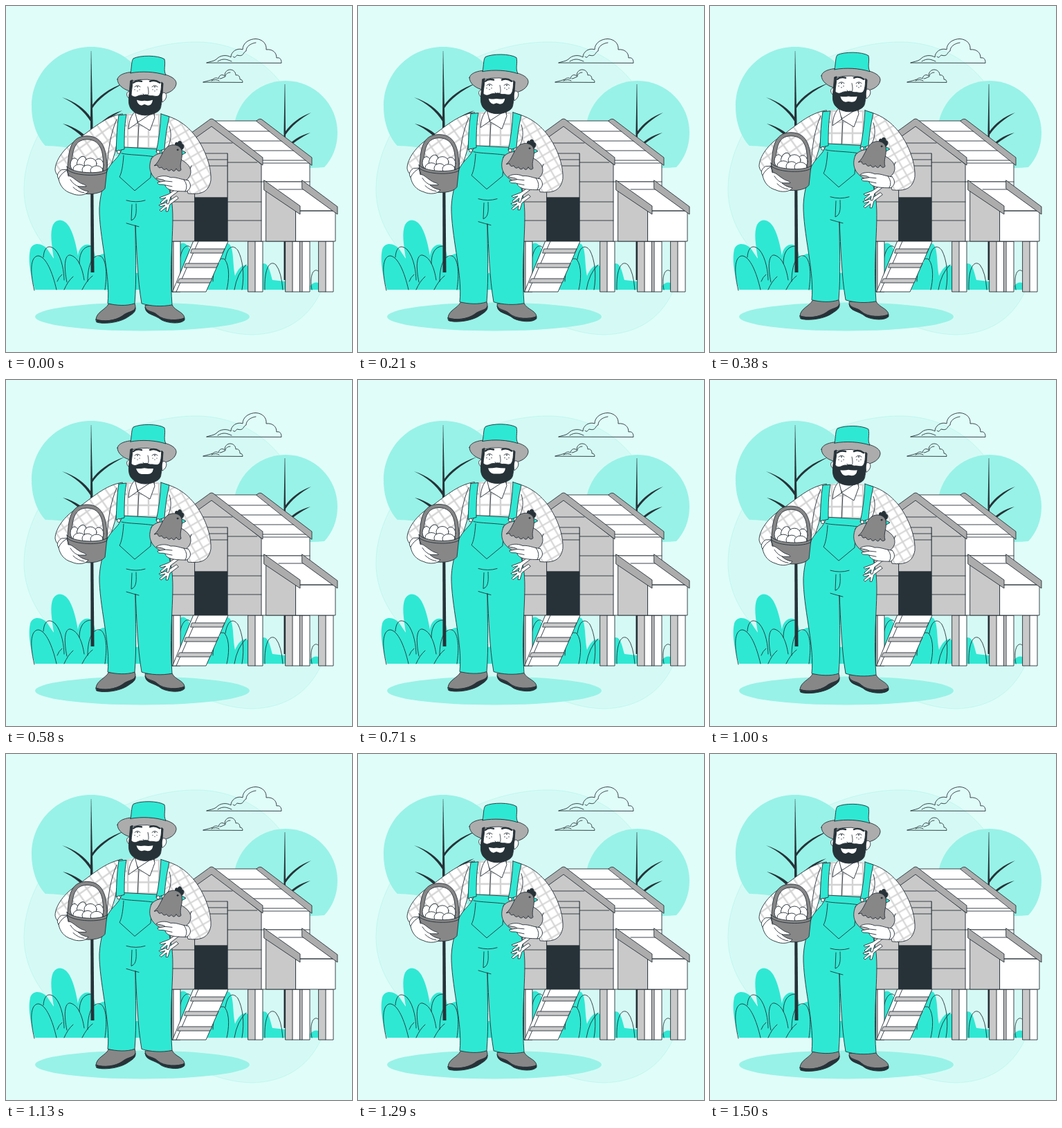
Animation of 500x500 px, one loop 1540 ms. Source, as an HTML page:

```html
<!DOCTYPE html>
<html lang="en">
<head>
<meta charset="utf-8">
<title>Farmer with hen</title>
<style>
  html, body { margin: 0; width: 100%; height: 100%; overflow: hidden; background: #e0fdf9; }
  svg { display: block; width: 100%; height: 100%; }
  .o { stroke: #263238; stroke-width: .9; stroke-linejoin: round; stroke-linecap: round; }
  .n { fill: none; }
  .w { fill: #fff; }
  .t { fill: #2fe8d3; }
  .m { fill: #98f2e7; }
  .d { fill: #263238; }
  .l { fill: #c9c9c9; }
  .g { fill: #acacac; }
  .k { fill: #878787; }
  .p { fill: none; stroke: #d2d2d2; stroke-width: 2.4; }
  .brow { fill: none; stroke-width: 2.4; }
</style>
</head>
<body>
<svg viewBox="0 0 500 500">
  <defs>
    <pattern id="plaid" width="15" height="16" patternUnits="userSpaceOnUse" patternTransform="translate(3 5)">
      <path class="w" d="M0 0H15V16H0Z"/><path class="p" d="M8 0V16M0 8H15"/>
    </pattern>
    <pattern id="plaidL" href="#plaid" patternTransform="translate(5 4) rotate(-35) scale(.9)"/>
    <pattern id="plaidR" href="#plaid" patternTransform="translate(2 4) rotate(60) scale(.8)"/>
    <path id="foot" d="M247 264L235 272L222 277L224 279L231 277L223 284L225 286L233 280L232 286L235 286L238 276L250 267Z"/>
  </defs>

  <!-- backdrop -->
  <path fill="#d5faf5" stroke="#b5f5ed" stroke-width=".7" d="M26 265C26 205 65 145 110 110C160 72 220 52 275 52C325 52 370 75 398 112C425 150 433 200 436 250C440 310 466 340 462 385C460 400 458 407 455 413C435 455 400 474 355 475C300 474 265 445 200 430C100 405 27 345 26 265Z"/>
  <path class="m" d="M57 202C45 190 37 168 37 145C37 97 75 59 123 59C171 59 209 97 209 145C209 180 190 210 160 217C125 213 90 202 57 202Z"/>
  <path class="m" d="M345 230C335 217 329 201 329 183C329 142 362 108 404 108C446 108 479 142 479 183C479 203 472 220 460 233C420 236 380 234 345 230Z"/>
  <ellipse class="m" cx="197" cy="449" rx="155" ry="20.5"/>

  <!-- clouds -->
  <g class="o n">
    <path d="M290 82C296 80 300 80 304 77C309 71 319 70 325 74C325 66 334 60 342 63C342 53 352 47.500 361 47.500C371 48 377 55 376 63C385 62 391 67 391 75C396 74 398 77 398 82ZM306 80C314 75 319 77 326 80M328 73C331 77 333 71 334 71C344 74 342 67 347 65C347 59 353 54 361 53"/>
    <path d="M285 110C292 108 293 108 299 106C302 103 306 104 307 105C308 100 312 98 316 101C316 95 320 92 324 92C329 92 332 96 332 100C336 99 338 102 338 106C341 106 342 108 342 110ZM297 108Q303 105 308 108M309 105C312 105 314 103 317 102C317 98 321 96 324 96"/>
  </g>

  <!-- bushes and trees -->
  <path class="t" d="M42 410C37 394 31 370 35 352C38 341 53 342 60 352L69 365C66 345 63 327 68 316C74 306 85 308 92 320C99 333 102 350 104 361C105 348 115 342 122 346C130 352 126 365 133 362C145 352 152 360 153 390L240 380V345H250C258 338 266 345 271 370L290 378C296 362 304 362 309 372C308 352 314 342 321 343C330 347 327 372 331 390C338 374 348 370 352 380L372 372C380 372 382 386 385 396L404 398L440 404Q446 396 457 402V410Z"/>
  <g class="d">
    <path d="M122.800 65H123.200L125.500 170L127.500 385H122.500L122 170Z"/>
    <path d="M81 132C100 138 115 149 123 162V168C113 152 99 140 81 132ZM82 170C101 175 115 185 123 198V203C112 189 99 178 82 170ZM172 111C148 119 133 131 124 144V149C133 135 148 123 172 111ZM168 151C148 157 134 169 125 183V187C134 173 148 162 168 151ZM402.700 113H403.300L404 180V396H401.500V180ZM441 154C424 160 412 170 404 181V186C413 173 425 163 441 154ZM440 183C424 187 413 195 404 205V209C414 198 426 190 440 183Z"/>
  </g>
  <g class="o n">
    <path d="M41 411C33 378 37 361 47 361C58 363 67 384 73 410M54 363C55 348 62 344 71 352C81 363 84 386 84 396M74 398Q76 392 81 388M88 399C83 375 85 359 93 360C104 363 110 377 113 396M106 372C106 354 114 346 125 347M118 398C118 372 126 359 136 361C146 366 146 390 143 410M84 410Q89 398 97 391M110 410Q117 396 125 390"/>
    <path d="M250 382C250 355 258 345 264 347C272 351 275 371 270 393M299 398C300 372 308 362 316 366C324 376 322 398 319 410M317 366C320 347 328 344 335 353C342 366 345 388 341 410M330 410Q334 386 347 374M374 410C373 380 381 366 390 374Q398 384 400 410M442 410C438 388 445 378 451 383"/>
  </g>

  <!-- coop -->
  <g class="o">
    <path class="w" d="M240 340h12v73h-12zM360 340h11v73h-11zM414 340h11v73h-11zM428 340h11v73h-11zM462 340h11v73h-11z"/>
    <path class="l" d="M350 340h10v73h-10zM404 340h10v73h-10zM425 340h3v73h-3zM452 340h10v73h-10zM240 340h2v73h-2z"/>
    <path class="w" d="M369 222H439V340H369Z"/>
    <path class="l" d="M238 210L297 170L369 229V340H238Z"/>
    <path class="n" d="M369 254H439M262 198H327M240 226H363M240 254H369M240 283H369M240 310H369M273 213V340M320 213V340"/>
    <path class="l" d="M273 213H320V277H273Z"/>
    <path class="n" d="M273 222H320M273 231H320"/>
    <path class="d" d="M273 277H320V340H273Z"/>
    <path class="w" d="M297 166H367L441 223V227H371Z"/>
    <path class="n" d="M316 181H387M334 195H405M352 209H423M371 223H441"/>
    <path class="g" d="M362 166Q367 161 371 165L442 219V230ZM293 165Q297 161 301 165L371 219V230L297 174L255 204V193Z"/>
    <path class="l" d="M376 262L419 296V340H376Z"/>
    <path class="w" d="M419 296H476V340H419ZM373 253L380 254H429L479 296H425Z"/>
    <path class="n" d="M394 265H441"/>
    <path class="g" d="M373 252L425 289V301L373 266ZM428 252L479 290V301L428 264Z"/>
    <path class="w" d="M271 340H321L289 413H241Z"/>
    <path class="n" d="M278 340L246 413"/>
    <path class="l" d="M269 351H316L313 357H267ZM260 372H307L304 378H258ZM251 394H298L295 400H248Z"/>
  </g>

  <g id="farmer" class="o">
    <!-- shoes -->
    <path class="k" d="M148 431C144 439 131 442 130 453C140 457 158 455 169 448C177 441 188 442 187 434L186 430ZM201 433C201 443 213 440 219 447C228 455 249 455 258 451C257 442 244 441 240 432Z"/>
    <path class="d" d="M130 453C142 457 158 455 168 448C176 441 185 443 187 436C188 442 183 445 177 449C163 459 138 460 131 457ZM201 436C204 443 213 441 219 447C228 456 249 455 258 451V454C253 460 235 459 225 454C214 445 202 447 201 436Z"/>

    <!-- shirt -->
    <path fill="url(#plaidL)" d="M168 156C143 160 126 177 102 194C85 204 71 223 71 237C73 248 82 250 89 246L148 243L158 210Z"/>
    <path fill="url(#plaidR)" d="M228 158C253 163 271 181 282 201C291 217 297 237 296 252C293 269 282 273 263 271L257 249L225 232Z"/>
    <path class="n" d="M146 238C147 210 151 184 160 164M232 208C240 194 239 183 236 174M258 250Q265 241 268 231"/>
    <path fill="url(#plaid)" stroke="none" d="M163 158L182 155H215L234 160L227 215H163Z"/>
    <path class="n" d="M192 171L190 207"/>
    <path class="w" d="M187 149L215 150L213 165L193 170L186 161Z"/>
    <path class="w" d="M186 153C181 159 178 164 177 178L190 169ZM213 154L215 161L208 180L190 169Z"/>

    <!-- overalls -->
    <path class="t" d="M168 204L225 207C227 232 234 253 239 280C245 312 235 365 240 432C225 435 209 434 196 430C190 395 189 355 187 317C187 355 189 395 186 430C174 434 160 433 147 430C151 391 137 345 135 300C134 279 141 257 146 238C154 222 165 220 168 204Z"/>
    <path class="n" d="M167 213C178 216 206 215 225 220M170 216C169 231 167 242 164 247L186 267L209 248L211 219M174 281Q188 285 201 281M182 287L181 310C190 307 188 294 188 286M174 314Q184 317 192 319"/>
    <path class="t" d="M163 158L174 157C171 174 171 190 171 207L159 210C160 191 160 174 163 158ZM224 156L236 160C232 177 230 193 229 207L217 211C221 193 223 175 224 156Z"/>
    <g class="w"><circle cx="163" cy="211" r="2.5"/><circle cx="220" cy="211" r="2.5"/></g>

    <!-- basket -->
    <path class="k" d="M89 237C90 211 92 188 117 188C143 188 146 214 146 238L140 240C142 215 139 193 117 193C96 193 95 215 95 239Z"/>
    <g class="w">
      <ellipse cx="99" cy="229" rx="6" ry="9"/><ellipse cx="134" cy="230" rx="7" ry="9"/>
      <ellipse cx="109" cy="226" rx="6" ry="9" transform="rotate(25 109 226)"/>
      <ellipse cx="122" cy="228" rx="9" ry="8"/>
      <ellipse cx="106" cy="236" rx="9" ry="7"/><ellipse cx="118" cy="237" rx="8" ry="7"/><ellipse cx="131" cy="238" rx="9" ry="7"/>
    </g>
    <path class="k" d="M88 232C95 242 137 244 146 236L143 264C137 273 115 273 107 270C96 264 91 250 88 232Z"/>
    <path class="n" d="M89 237C99 246 137 247 146 240"/>
    <path class="w" d="M80 237C74 241 73 246 76 250C78 260 84 268 95 271C103 275 116 274 119 268C112 267 107 264 104 261L116 261C116 258 110 258 106 255C98 250 94 245 90 246L88 237Z"/>
    <path class="n" d="M76 250Q80 241 89 237M93 251Q98 259 105 261M97 262Q104 269 113 270"/>

    <!-- hen -->
    <g class="w"><use href="#foot" x="-1" y="11"/><use href="#foot"/></g>
    <path fill="#bdbdbd" d="M210 221C204 236 210 248 224 255C244 262 265 255 267 241C268 230 257 224 247 219C231 209 216 212 210 221Z"/>
    <path class="d" d="M245 203C243 198 246 196 248 198C250 193 255 196 254 200C258 199 258 206 254 208Z"/>
    <path class="t" d="M253 208L260 212L253 216Z"/>
    <path class="k" d="M234 203C240 199 252 200 254 209C256 221 250 227 253 237Q249 241 246 235Q243 242 239 236Q235 241 232 235Q228 239 225 233Q220 236 219 230L214 231C223 225 225 209 234 203Z"/>
    <circle class="d" cx="248" cy="208" r="1"/>
    <path class="w" d="M263 252C252 251 247 247 238 248C230 244 220 246 217 249C222 251 227 250 230 253L219 255C219 260 227 257 230 259C232 267 245 268 261 268C268 264 268 257 263 252Z"/>
    <path class="n" d="M230 253L240 254M230 259L240 261M257 251Q264 260 259 268"/>

    <!-- head -->
    <path class="g" d="M161 106C163 96 183 94 205 95C230 97 247 103 246 113C244 124 230 128 221 128L183 124C170 122 161 114 161 106Z"/>
    <path class="w" d="M180 124C174 122 172 130 179 135ZM225 126C233 122 235 134 226 139Z"/>
    <path class="w" d="M181 109Q205 102 226 112L224 143H179Z"/>
    <path class="t" d="M180 97C182 87 181 80 184 76C194 71 220 71 229 77C231 86 227 92 231 100C216 95 196 94 180 97Z"/>
    <path class="d" d="M180 108L183 107C183 116 181 123 181 129C188 135 190 128 197 129Q203 127 208 130C215 129 220 134 223 126C225 119 224 116 225 110L227 112L226 127C222 139 228 149 217 154C207 160 193 159 185 153C176 147 177 137 178 127Z"/>
    <path id="mouth" class="w" stroke="none"/>
    <path class="brow" d="M184 111Q189 107 196 109M208 109Q215 106 222 111"/>
    <path class="n" d="M186 117Q190 113 194 117M211 117Q215 113 219 117M205 117C206 122 207 128 204 129Q200 131 198 127"/>
    <g class="d" stroke="none">
      <circle cx="190" cy="117" r=".9"/><circle cx="215" cy="117" r=".9"/>
      <circle cx="186" cy="121" r=".7"/><circle cx="190" cy="123" r=".7"/><circle cx="193" cy="121" r=".7"/>
      <circle cx="212" cy="121" r=".7"/><circle cx="215" cy="123" r=".7"/><circle cx="218" cy="121" r=".7"/>
    </g>
  </g>
</svg>
<script>
  const LOOP = 1540, LIFT = 8.5, LEAD = 60;
  const farmer = document.getElementById('farmer');
  const mouth = document.getElementById('mouth');
  const start = performance.now();

  function draw() {
    const t = (performance.now() - start) % LOOP;
    const k = (1 - Math.cos(2 * Math.PI * (t + LEAD) / LOOP)) / 2;
    farmer.setAttribute('transform', `translate(0 ${-LIFT * k})`);
    // The smile widens as the body rises.
    const top = 138 - 2 * k, side = 189 - k;
    mouth.setAttribute('d', `M${side} 136Q195 ${top} 200 ${top - 1}Q206 ${top} ${401 - side} 136Q${211 + k} 144 205 144L200 ${142 + 2 * k}L196 144Q190 143 ${side} 136Z`);
    requestAnimationFrame(draw);
  }
  draw();
</script>
</body>
</html>
```
